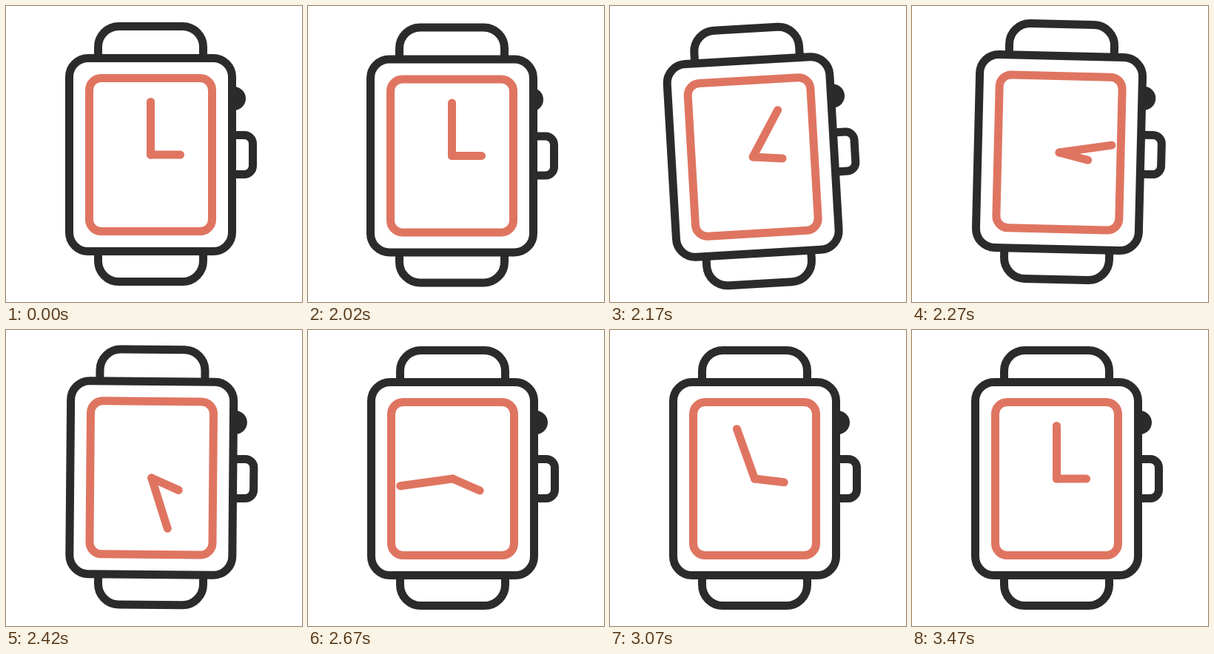
These frames come from a looping animation (400 by 400 pixels, 3.52 s). An HTML page:

```html
<!DOCTYPE html>
<html lang="en">
<head>
<meta charset="utf-8">
<title>Watch</title>
<style>
  html, body { margin: 0; width: 100%; height: 100%; overflow: hidden; background: #fff; }
  svg { display: block; width: 100%; height: 100%; }
  .dark { fill: none; stroke: #2b2b2b; stroke-width: 11; }
  .coral { fill: none; stroke: #df7561; stroke-width: 11; stroke-linecap: round; }
</style>
</head>
<body>
<svg viewBox="0 0 400 400">
  <g id="watch">
    <g class="dark">
      <path d="M124.5 72V55.5a28 28 0 0 1 28-28h86a28 28 0 0 1 28 28V72"/>
      <path d="M124.5 330v14.500a28 28 0 0 0 28 28h86a28 28 0 0 0 28-28V330"/>
      <path d="M306 174.500h16a11.500 11.500 0 0 1 11.500 11.500v30a11.500 11.500 0 0 1-11.500 11.500h-16"/>
    </g>
    <circle id="button" cx="308" cy="125" r="16" fill="#2b2b2b"/>
    <rect class="dark" style="fill:#fff" x="85.500" y="70.500" width="220" height="261" rx="25.500"/>
    <g class="coral">
      <rect x="112.500" y="97.500" width="166" height="207" rx="16"/>
      <path id="minute" d="M195.500 201V129.500"/>
      <path id="hour" d="M195.500 201H235.500"/>
    </g>
  </g>
</svg>
<script>
  const LOOP = 3520;
  const CENTER = '195.5 201';

  // Cubic bezier easing, solved for x by bisection.
  function bezier(x1, y1, x2, y2) {
    const at = (a, b, s) => 3 * s * (1 - s) ** 2 * a + 3 * s * s * (1 - s) * b + s ** 3;
    return x => {
      let lo = 0, hi = 1;
      for (let i = 0; i < 24; i++) {
        const mid = (lo + hi) / 2;
        if (at(x1, x2, mid) < x) lo = mid; else hi = mid;
      }
      return at(y1, y2, (lo + hi) / 2);
    };
  }

  const smooth = bezier(0.33, 0, 0.67, 1);
  const out = bezier(0.2, 0.3, 0.6, 1);
  const sweep = bezier(0.21, 0, 0.26, 1);
  const swing = bezier(0.28, 0, 0.72, 1);
  const settle = bezier(0.22, 0, 0.52, 1);

  // Each track: [time, value, easing towards the next key]
  const tracks = {
    x: [[2020, -1, out], [2090, -6.5, smooth], [2270, 3.5, smooth], [2520, 0]],
    y: [[2020, 1.4, out], [2090, 7.2, smooth], [2270, -3, smooth], [2520, 0]],
    tilt: [[2020, 0, smooth], [2145, -3.9, smooth], [2270, 1.4, smooth], [2520, 0]],
    press: [[2020, -5, out], [2070, -9, smooth], [2150, 0]],
    minute: [[2020, 0, sweep], [3470, 360]],
    hour: [[2020, 0, swing], [2520, 27, settle], [3470, 0]]
  };

  function value(name, t) {
    const keys = tracks[name];
    if (t < keys[0][0]) return 0;
    for (let i = 1; i < keys.length; i++) {
      const [t0, v0, ease] = keys[i - 1], [t1, v1] = keys[i];
      if (t < t1) return v0 + (v1 - v0) * ease((t - t0) / (t1 - t0));
    }
    return keys[keys.length - 1][1];
  }

  const part = id => document.getElementById(id);
  const watch = part('watch'), button = part('button');
  const minute = part('minute'), hour = part('hour');
  const turn = angle => `rotate(${angle} ${CENTER})`;

  // The picture is held for 30 ms and 20 ms in turn.
  const hold = t => t - t % 50 + (t % 50 >= 20 ? 20 : 0);

  function draw() {
    const t = hold(performance.now() % LOOP);
    const v = name => value(name, t);
    watch.setAttribute('transform', `translate(${v('x')} ${v('y')}) ${turn(v('tilt'))}`);
    button.setAttribute('transform', `translate(${v('press')} 0)`);
    minute.setAttribute('transform', turn(v('minute')));
    hour.setAttribute('transform', turn(v('hour')));
    requestAnimationFrame(draw);
  }
  draw();
</script>
</body>
</html>
```
